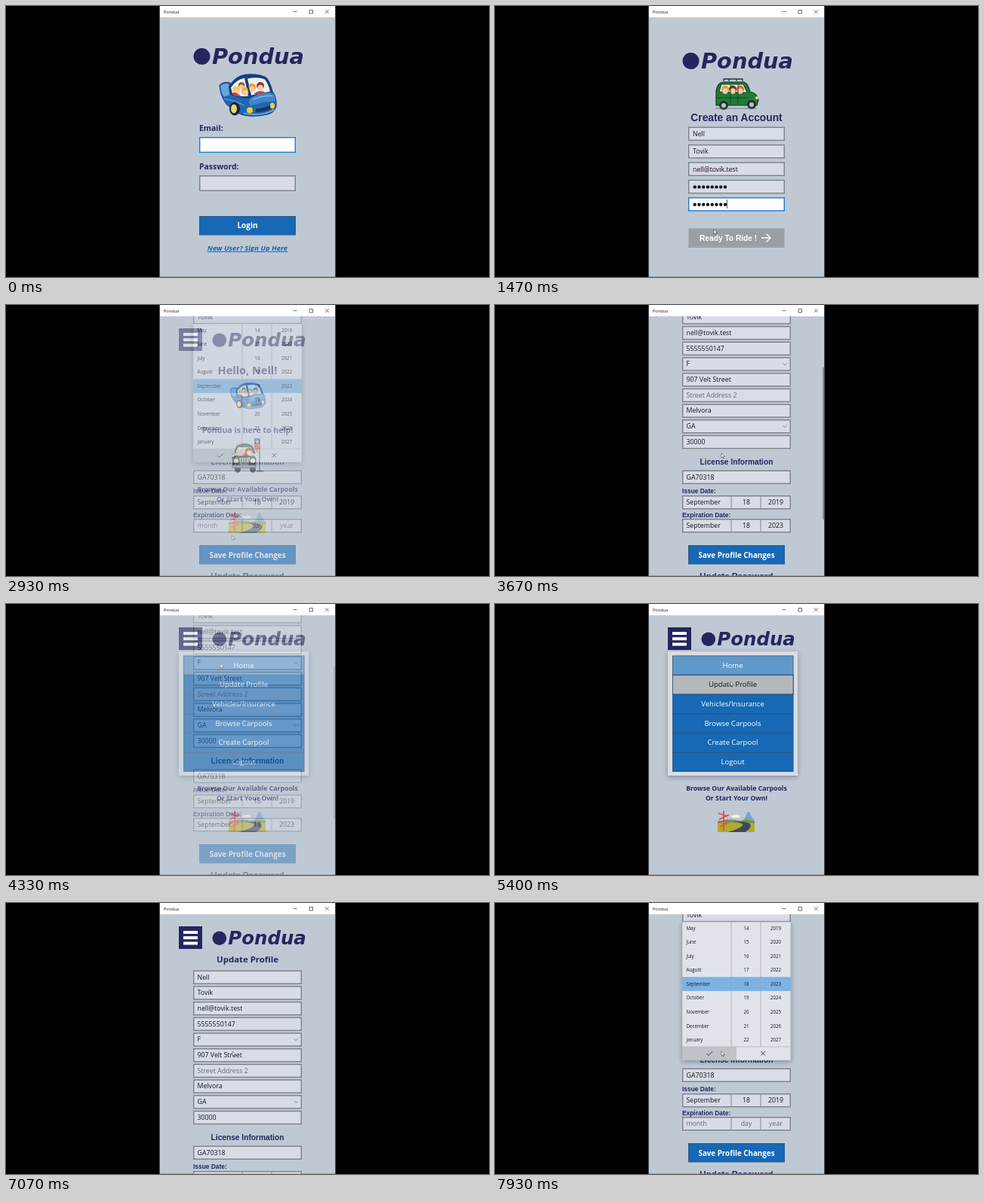
Animation, 640 px wide and 360 px high, one loop 8000 ms. Source, as an HTML page:

```html
<!DOCTYPE html>
<html lang="en">
<head>
<meta charset="utf-8">
<title>Carpool app demo</title>
<style>
  html, body { margin: 0; height: 100%; overflow: hidden; background: #000; }
  svg { display: block; width: 100vw; height: 100vh; }
  text { font-family: "Open Sans", "Noto Sans", sans-serif; white-space: pre; }
  .plain { font-family: "Liberation Sans", Arial, sans-serif; font-weight: 700; }
  .bold { font-weight: 700; }
  .wordmark { font-family: "DejaVu Sans", sans-serif; font-weight: 700; font-style: italic; }
</style>
</head>
<body>
<svg id="stage" viewBox="0 0 640 360"></svg>
<script>
const LOOP = 8000;
const NAVY = '#25265f', BLUE = '#1769b5', LIGHT = '#6099c9', PAGE = '#bfc9d4',
      FIELD = '#d8dce6', EDGE = '#7c8089', INK = '#15161c', HINT = '#666a74';
const BRAND = 'Pondua', FIRST = 'Nell', LAST = 'Tovik', MAIL = 'nell@tovik.test';

// Drawing helpers
const rect = (x, y, w, h, fill, extra = '') =>
  `<rect x="${x}" y="${y}" width="${w}" height="${h}" fill="${fill}" ${extra}/>`;
const path = (d, fill = 'none', stroke = 'none', width = 1) =>
  `<path d="${d}" fill="${fill}" stroke="${stroke}" stroke-width="${width}"/>`;
const disc = (x, y, r, fill, ry = r) =>
  `<ellipse cx="${x}" cy="${y}" rx="${r}" ry="${ry}" fill="${fill}"/>`;
const label = (x, y, string, size, fill = NAVY, cls = '', anchor = 'start', extra = '') =>
  `<text x="${x}" y="${y}" font-size="${size}" fill="${fill}" class="${cls}" text-anchor="${anchor}" ${extra}>${string}</text>`;
const centered = (x, y, string, size, fill, cls) => label(x, y, string, size, fill, cls, 'middle');
const place = (x, y, scale, content) =>
  `<g transform="translate(${x} ${y}) scale(${scale})">${content}</g>`;
const during = (from, to, content) => `<g data-from="${from}" data-to="${to}">${content}</g>`;
const box = (x, y, w, h, fill = FIELD, edge = EDGE, line = 1.4) =>
  rect(x + line / 2, y + line / 2, w - line, h - line, fill, `stroke="${edge}" stroke-width="${line}"`);
const button = (y, fill, edge = '#2b5c90') => box(256, y, 128, 25.5, fill, edge, 1);

// Pictures
const logo = (x, y, scale = 1) => place(x, y, scale,
  disc(11.5, 15, 11, NAVY) + label(25, 25, BRAND, 28.8, NAVY, 'wordmark'));

const head = (x, y, hair, size = 1) => place(x, y, size,
  disc(0, -1.5, 5, hair) + disc(0, 1, 3.7, '#f4cda6'));

const blueCar = (x, y, scale = 1) => place(x, y, scale,
  // Body, rear wing and cabin
  path('M-37 -13Q-34 -18 -24 -17L2 2L33 -5Q39 2 38 15Q36 24 24 26Q4 30 -10 25L-27 13Q-36 2 -37 -13Z', '#2166b2', '#153a78', 1) +
  path('M-36 -12Q-31 -17 -25 -15L-24 0L-31 2Q-35 -3 -36 -12Z', '#6ba5da') +
  path('M-25 -11Q-17 -26 -2 -28Q18 -29 26 -23Q32 -14 34 -3L4 4Q-12 5 -23 -1Z', '#163f80') +
  path('M-22 -10Q-16 -20 -4 -23L1 1Q-12 3 -20 -2Z', '#f0eee0') +
  path('M0 -22Q14 -25 23 -21Q28 -14 30 -5L5 0Z', '#edf1f0') +
  head(-15, -6, '#f0c82c', .9) + head(-8, -12, '#a9492d', .8) + head(-3, -4, '#f3b321') +
  head(6, -9, '#e4a328') + head(17, -11, '#a52f22') +
  path('M-21 -3Q-15 -5 -9 1H-18ZM8 -1Q13 -7 21 -5L25 -3Z', '#d73c31') +
  path('M-3 -26L4 3', 'none', '#163f80', 2.2) +
  // Bonnet, lamps, grille and wheels
  path('M5 3Q21 -5 33 -3Q38 2 37 8Q20 8 4 14Q-1 10 5 3Z', '#3f86cb') +
  path('M7 6Q21 0 33 1', 'none', '#80b6e8', 1.5) +
  path('M-31 5Q-16 7 -4 14', 'none', '#5798d5', 1.4) +
  disc(-17, 18, 7, '#18243e', 9) + disc(-18, 18, 4, '#e5d56c', 6) +
  path('M11 18Q24 17 33 12L34 17Q24 22 11 23Z', '#173562') +
  path('M-5 24Q18 29 36 19', 'none', '#77ade0', 1.6) +
  disc(3, 20, 4, '#f3cf30') + disc(33, 14, 3, '#f3cf30', 4));

const greenVan = place(320, 117, 1,
  path('M-17 -17V-20H8V-17M-10 -20V-17M0 -20V-17', 'none', '#253638', 1.3) +
  path('M-27 -4Q-25 -16 -17 -16H10Q16 -13 18 -3Q28 -1 29 8L27 15H-27Z', '#207b38', '#123c20', 1.2) +
  path('M-23 -3L-20 -13H9L14 -2Z', '#eef0e7', '#123c20') +
  head(-15, -5, '#dfa237') + head(-5, -5, '#6b3525') + head(5, -5, '#d96c32') +
  path('M-8 -13V13M2 -13V13M-25 5H16', 'none', '#123c20', .8) +
  disc(-17, 15, 6, '#292d32') + disc(20, 14, 6, '#292d32') +
  disc(-17, 15, 3, '#bcc3c8') + disc(20, 14, 3, '#bcc3c8') +
  disc(27, 5, 2, '#f2e18b') + path('M-28 19H27', 'none', '#5c6866', .8));

const busStop = place(320, 200, 1,
  disc(-13, 18, 4, '#191d20', 5) + disc(7, 18, 4, '#191d20', 5) +
  path('M-17 -4L-14 -13Q-4 -18 6 -13L10 -3Z', '#34543b', '#171c1d') +
  path('M-15 -3L-12 -11H4L8 -2Z', '#dcded8') +
  head(-10, -4, '#e9e5d5') + head(2, -4, '#99502e') +
  path('M-7 2L-3 -4L6 3Z', '#c53c32') +
  path('M-20 3Q-17 -1 -12 1H4Q10 -1 11 5L10 16H-19Z', '#3e4c45', '#181e20') +
  path('M-11 3H3L1 13H-9Z', '#c8cdcb') +
  path('M-8 4V12M-5 4V12M-2 4V12M1 4V12', 'none', '#252e2f', .9) +
  disc(-15, 7, 3, '#eff0dc') + disc(7, 7, 3, '#eff0dc') +
  rect(-20, 13, 31, 3, '#aeb4b5', 'stroke="#24292c" stroke-width=".7"') +
  path('M16 21V-22H10V-9H16M12 21H21', 'none', '#3a424c', 1.4) +
  disc(12, -12, 3, '#d33c34', 4) + path('M11 -8L14 -4', 'none', '#d33c34', 1.5));

const road = place(320, 289, 1,
  path('M8 -1L12 -6L14 -12L17 -13L20 -6L24 -1Z', '#76a2ce') +
  disc(-1, -7, 6, '#edf1f3', 2) + rect(-25, -1, 49, 15, '#b5aa20') +
  path('M-25 0Q-8 -5 5 -1Q16 -4 24 0V2H-25Z', '#789548') +
  path('M-9 1Q12 -2 18 3Q22 8 12 14H-12Q8 8 8 4Q5 1 -9 1Z', '#424956') +
  path('M-12 13Q8 8 8 4Q5 1 -9 1M12 14Q22 8 18 3', 'none', '#aeb1a7', .7) +
  path('M-17 -14V12M-24 -11L-12 -7M-23 -3L-10 -9M-24 1L-11 -2M-22 7L-12 2', 'none', '#d9524c', 1.8));

const arrowCursor = path('M0 0V6.2L1.5 4.8L2.5 7.1L3.4 6.7L2.4 4.5H4.5Z', '#fff', '#30343a', .55);

// Pages
const login = logo(248, 52) + blueCar(320, 118.5) +
  label(256, 166, 'Email:', 10.4, NAVY, 'bold') +
  box(256, 174, 128, 21, '#fff', '#1d7bd0') +
  label(256, 217, 'Password:', 10.4, NAVY, 'bold') + box(256, 225, 128, 21) +
  button(279, BLUE) + centered(320, 295, 'Login', 10, '#fff', 'bold') +
  label(320, 325, 'New User? Sign Up Here', 9.5, '#1b5eae', 'bold', 'middle',
    'font-style="italic" text-decoration="underline"');

const signupField = (row, value) => {
  const y = 160.5 + row * 23.4, focused = row === 4;
  const dots = Array.from({ length: 8 }, (_, i) => disc(264.7 + i * 5.75, y + 9.7, 2.2, INK)).join('');
  return box(256, y, 128, 18.6, focused ? '#fff' : FIELD, focused ? '#1d7bd0' : EDGE) +
    (value ? label(262, y + 12.3, value, 8.8, INK) : dots);
};
const squiggle = 'M262 220' + 'l1.5 -1l1.5 1'.repeat(17);
const signup = logo(248, 58) + greenVan +
  centered(320, 152.5, 'Create an Account', 13.8, NAVY, 'plain') +
  [FIRST, LAST, MAIL, '', ''].map((value, row) => signupField(row, value)).join('') +
  path(squiggle, 'none', '#d55359', .6) + path('M307.5 257V269', 'none', INK, .7) +
  button(295, BLUE) + during(1470, 1600, button(295, '#989fa7', '#a9b0b8')) +
  label(271, 311.5, 'Ready To Ride !', 10.2, '#fff', 'plain') +
  path('M353 308H365M359.5 302.5L365 308L359.5 313.5', 'none', '#fff', 1.3);

const header = rect(229, 31, 31, 30, NAVY) +
  [37, 44.2, 51.5].map(y => rect(235, y, 19, 4, '#fff')).join('') + logo(273, 34, .85);

const home = header + centered(320, 92, `Hello, ${FIRST}!`, 14.5, NAVY, 'bold') +
  blueCar(320, 120.5, .62) +
  centered(320, 170, `${BRAND} is here to help!`, 10.55, NAVY, 'bold') + busStop +
  centered(320, 248, 'Browse Our Available Carpools', 8.74, NAVY, 'bold') +
  centered(320, 261, 'Or Start Your Own!', 8.74, NAVY, 'bold') + road;

const menuItem = (row, name, fill, ink = '#fff') => {
  const y = 68.5 + row * 25.7;
  return box(235, y, 160.5, 26, fill, '#234f80', .8) + centered(315, y + 16, name, 9.6, ink);
};
const menu = rect(229, 63, 172, 165, '#d9dde2', 'filter="url(#shadow)"') +
  ['Home', 'Update Profile', 'Vehicles/Insurance', 'Browse Carpools', 'Create Carpool', 'Logout']
    .map((name, row) => menuItem(row, name, row ? BLUE : LIGHT)).join('') +
  during(5200, 5870, menuItem(1, 'Update Profile', LIGHT)) +
  during(5400, 5600, menuItem(1, 'Update Profile', '#b4b7bc', INK));

const hints = ['', '', '', 'Cell Phone', 'Gender', 'Street Address 1', 'Street Address 2', 'City', 'State', 'Zip Code'];
const entries = [FIRST, LAST, MAIL, '5555550147', 'F', '907 Velt Street', '', 'Melvora', 'GA', '30000'];

const formField = (y, value, hint, dropdown) => box(248, y - 9, 144, 18.4) +
  label(253.5, y + 3, value || hint, 8.8, value ? INK : HINT) +
  (dropdown ? path(`M381.5 ${y - 1.2}l2.7 2.7l2.7 -2.7`, 'none', '#6d717a', .8) : '');
const dateField = (y, values, ink = INK) => box(248, y - 9, 144, 18.4) +
  path(`M313 ${y - 9}v18M352 ${y - 9}v18`, 'none', EDGE, .9) +
  label(253.5, y + 3, values[0], 8.8, ink) +
  centered(333, y + 3, values[1], 8.8, ink) + centered(372, y + 3, values[2], 8.8, ink);

const noDate = y => dateField(y, ['month', 'day', 'year'], HINT);
const date = (y, year) => dateField(y, ['September', 18, year]);

const profile = (filled, expiry = noDate(396)) => header +
  centered(320, 79, 'Update Profile', 11.4, NAVY, 'bold') +
  hints.map((hint, i) => formField(98.5 + i * 20.7, filled || i < 3 ? entries[i] : '', hint, i === 4 || i === 8)).join('') +
  centered(320, 315, 'License Information', 10.2, NAVY, 'plain') +
  formField(331.5, filled && 'GA70318', 'License Number') +
  label(248, 353, 'Issue Date:', 8.4, NAVY, 'plain') + (filled ? date(365, 2019) : noDate(365)) +
  label(248, 384.5, 'Expiration Date:', 8.4, NAVY, 'plain') + expiry +
  button(422, BLUE) + centered(320, 438.5, 'Save Profile Changes', 9.8, '#fff', 'bold') +
  centered(320, 467, 'Update Password', 11.6, NAVY, 'plain');

const months = ['May', 'June', 'July', 'August', 'September', 'October', 'November', 'December', 'January'];
const picker = rect(248, 25, 144, 184, '#e0e4ea', 'filter="url(#shadow)"') +
  rect(248, 98.3, 144, 18.6, '#7db3e3') +
  path('M313 25V191M352 25V191', 'none', '#aaa1a8', .8) +
  months.map((month, i) => {
    const y = 35.7 + i * 18.55;
    return label(253.5, y, month, 6.2, INK) + centered(333, y, 14 + i, 6.2, INK) + centered(372, y, 2019 + i, 6.2, INK);
  }).join('') +
  rect(248, 191, 72, 18, '#bfc3c7') + path('M248 191H392', 'none', '#b3b7bc', .8) +
  path('M280.5 200L283 202.5L288 197.5M352.5 197L358 202.5M358 197L352.5 202.5', 'none', INK, .8) +
  rect(248, 25, 144, 184, 'none', 'stroke="#a8adb4" stroke-width=".6"');

const scrolled = content => `<g transform="translate(0 -103)">${content}</g>`;
const PICKED = 3600;
const savedProfile = profile(true, during(0, PICKED, noDate(396)) + during(PICKED, LOOP, date(396, 2023)));

// Scenes: each covers the one before; cursor keys are [time, x, y]
const scenes = [
  { start: 0, fade: 0, art: login },
  { start: 950, fade: 380, art: signup, cursor: [[0, 290, 297]] },
  { start: 2030, slide: true, art: home, cursor: [[2030, 290, 297], [2300, 299, 306]] },
  { start: 2700, fade: 430,
    art: scrolled(savedProfile) + during(0, PICKED, picker) +
      during(PICKED, LOOP, rect(434.3, 83, 1.5, 202, '#747a83')),
    cursor: [[3700, 300, 197], [4000, 312, 327]] },
  { start: 4040, fade: 490, art: home + menu, cursor: [[5000, 284, 79], [5330, 312, 103]] },
  { start: 5870, slide: true, art: profile(false), cursor: [[5870, 312, 103], [6070, 305, 192]] },
  { start: 6640, fade: 430, art: profile(true), cursor: [[6640, 305, 192], [7000, 300, 197]] },
  { start: 7300, fade: 480, art: scrolled(profile(true)) + picker, cursor: [[0, 300, 197]] },
];

const stage = document.getElementById('stage');
stage.innerHTML = `<defs>
    <clipPath id="window"><rect x="204" y="15" width="232" height="344.5"/></clipPath>
    <filter id="shadow" x="-20%" y="-20%" width="140%" height="140%">
      <feDropShadow dx="0" dy="2" stdDeviation="3" flood-color="#222b38" flood-opacity=".4"/></filter>
  </defs>` +
  rect(0, 0, 640, 360, '#000') + rect(203.3, 0, 233.4, 360, '#70777e') + rect(204, 0, 232, 15, '#fff') +
  label(209, 9.8, BRAND, 5.6, INK) +
  path('M380.5 7.5H385.5M402 5.5H406.5V10H402ZM423 5.2L427.7 9.9M427.7 5.2L423 9.9', 'none', '#333', .7) +
  '<g clip-path="url(#window)">' + scenes.map(scene => '<g class="scene">' + rect(204, 15, 232, 345, PAGE) +
    `<g class="art">${scene.art}</g><g class="cursor">${scene.cursor ? arrowCursor : ''}</g></g>`).join('') + '</g>';

const clamp = value => Math.min(1, Math.max(0, value));
const ease = p => p * p * (3 - 2 * p);
const views = [...stage.querySelectorAll('.scene')].map(root => ({
  root, art: root.querySelector('.art'), cursor: root.querySelector('.cursor'),
}));
const timed = [...stage.querySelectorAll('[data-from]')];

function cursorAt(keys, t) {
  const [from, to = from] = keys;
  const p = ease(clamp((t - from[0]) / (to[0] - from[0] || 1)));
  return [1, 2].map(i => from[i] + (to[i] - from[i]) * p);
}

const covers = (scene, t) => scene && t >= scene.start + (scene.fade || 0);

function draw(t) {
  scenes.forEach((scene, i) => {
    const { start, fade, slide, cursor } = scene;
    const { root, art, cursor: pointer } = views[i], age = t - start;
    const hidden = age < 0 || covers(scenes[i + 1], t);
    root.style.display = hidden ? 'none' : '';
    if (hidden) return;
    root.setAttribute('opacity', fade ? clamp(age / fade) : 1);
    if (slide) {
      art.setAttribute('opacity', clamp(age / 150));
      art.setAttribute('transform', `translate(${20 * Math.exp(-age / 100)} 0)`);
    }
    if (cursor) pointer.setAttribute('transform', `translate(${cursorAt(cursor, t)})`);
  });
  for (const element of timed) {
    const { from, to } = element.dataset;
    element.style.display = t >= +from && t < +to ? '' : 'none';
  }
}

function tick() {
  draw(performance.now() % LOOP);
  requestAnimationFrame(tick);
}
tick();
</script>
</body>
</html>
```
